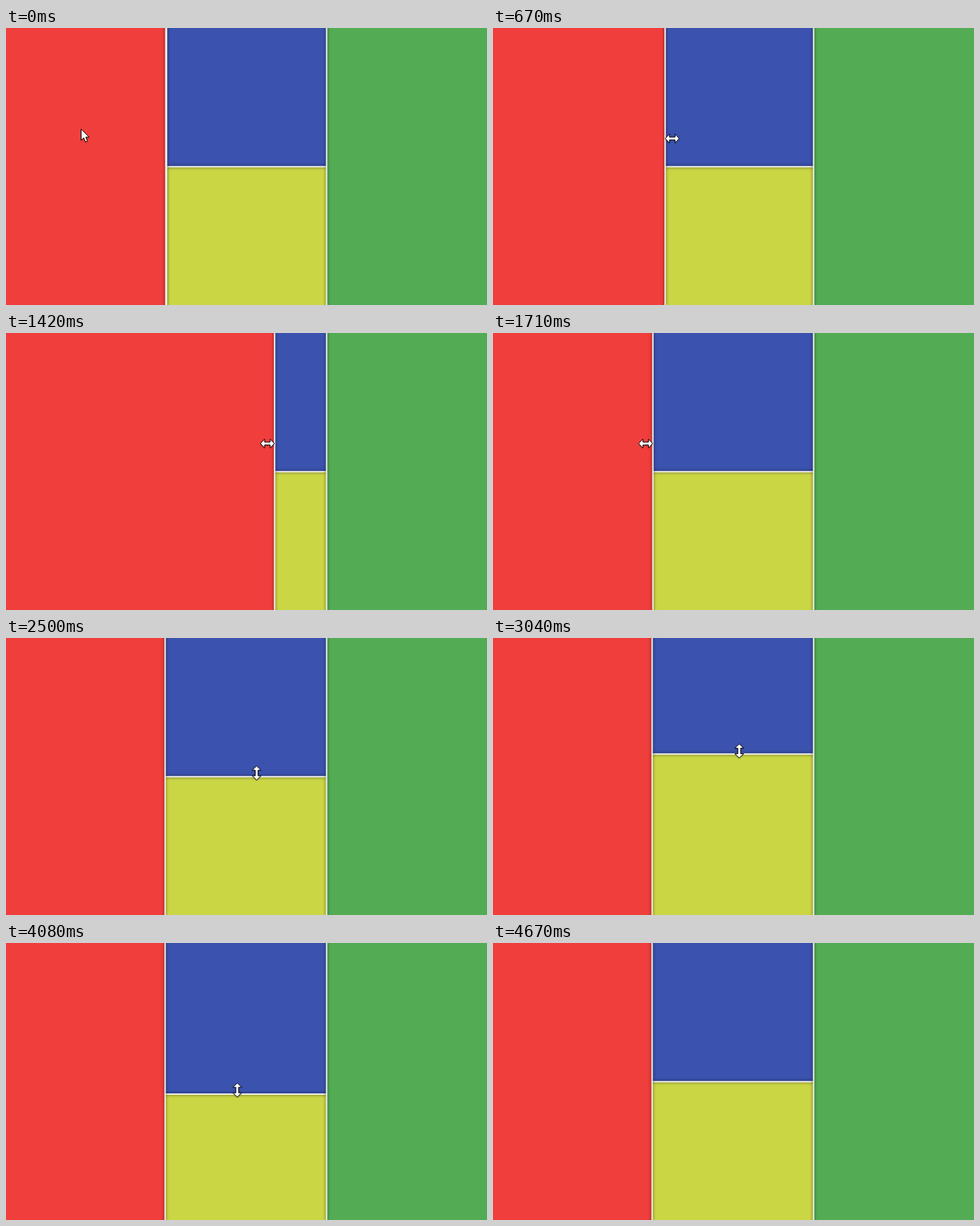
These frames come from a looping animation (688 by 396 pixels, 4930 ms). An HTML page with a canvas:

```html
<!DOCTYPE html>
<html lang="en">
<head>
<meta charset="utf-8">
<title>Split panes</title>
<style>
  html, body { margin: 0; width: 100%; height: 100%; overflow: hidden; }
  canvas { display: block; }
</style>
</head>
<body>
<canvas id="stage" width="688" height="396"></canvas>
<script>
const W = 688, H = 396, LOOP = 4930, RIGHT = 458.6;
const GRAB_X = 615, DROP_X = 1930, GRAB_Y = 2740, DROP_Y = 4130, EXIT = 4640;
const ctx = document.getElementById("stage").getContext("2d");
const arrow = new Path2D("M.5 .5V16.5L4.2 13 6.6 18.8 9.4 17.6 7 12H11.8Z");
const resize = new Path2D("M-10 0L-4-6.3V-2H4V-6.3L10 0 4 6.3V2H-4V6.3Z");

// Places the hand passes: time, x, y
const stops = [
  [40, 107, 144], [GRAB_X, 229, 158], [1140, 486, 158], [1212, 486, 158],
  [1790, 176, 158], [DROP_X, 228, 158], [2500, 358.5, 193], [GRAB_Y, 358.5, 193],
  [2900, 354, 10], [3250, 349.5, 386], [3580, 349.5, 386],
  [DROP_Y, 329, 193], [EXIT, 322, -4]
];

const clamp = (v, lo, hi) => Math.min(hi, Math.max(lo, v));
const progress = (t, from, to) => clamp((t - from) / (to - from), 0, 1);

function pointer(t) {
  let [, x, y] = stops[0];
  for (let i = 1; i < stops.length; i++) {
    const u = progress(t, stops[i - 1][0], stops[i][0]);
    x += u * (stops[i][1] - stops[i - 1][1]);
    y += u * (stops[i][2] - stops[i - 1][2]);
  }
  // Free moves between the drags: a dip, a full loop, a deep dip
  const turn = 2 * Math.PI * progress(t, DROP_X, 2500);
  x += 90 * Math.sin(turn);
  y += 60 * (1 - Math.cos(turn));
  y += 27 * Math.sin(Math.PI * progress(t, 40, GRAB_X));
  y += 250 * Math.sin(Math.PI * progress(t, DROP_Y, EXIT));
  return { x, y };
}

function fill(color, x, y, w, h) {
  ctx.fillStyle = color;
  ctx.fillRect(x, y, w, h);
}

function shade(color, blur, dy = 0) {
  ctx.shadowColor = color;
  ctx.shadowBlur = blur;
  ctx.shadowOffsetY = dy;
}

function bar(x, y, w, h) {
  shade("rgba(0, 0, 0, .65)", 4.5);
  fill("#f2f2ec", x, y, w, h);
  shade("transparent", 0);
}

function drawCursor(t) {
  const { x, y } = pointer(t);
  const upright = t >= 2450 && t < DROP_Y + 40;
  const sideways = t >= 520 && t < DROP_X;
  const shape = upright || sideways ? resize : arrow;
  ctx.save();
  ctx.translate(x, y);
  if (upright) ctx.rotate(Math.PI / 2);
  shade("rgba(0, 0, 0, .4)", 2, 1);
  ctx.fillStyle = "#fff";
  ctx.fill(shape);
  shade("transparent", 0);
  ctx.stroke(shape);
  ctx.restore();
}

function draw(t) {
  // The column edge trails the hand a little
  const x = Math.min(457, pointer(clamp(t - 20, GRAB_X, DROP_X)).x) - .4;
  const y = pointer(clamp(t, GRAB_Y, DROP_Y)).y * 1.03 - .5;
  fill("#3b52ae", 0, 0, W, H);
  fill("#cbd645", 0, y, W, H);
  bar(0, y - 1, W, 2);
  fill("#f03e3c", 0, 0, x, H);
  fill("#53ab54", RIGHT, 0, W, H);
  bar(x - 1, -9, t < GRAB_X ? 3 : 2, H + 18);
  bar(RIGHT - 1, -9, 2, H + 18);
  if (t < 4670) drawCursor(t);
}

const start = performance.now();
function tick() {
  draw((performance.now() - start) % LOOP);
  requestAnimationFrame(tick);
}
tick();
</script>
</body>
</html>
```
